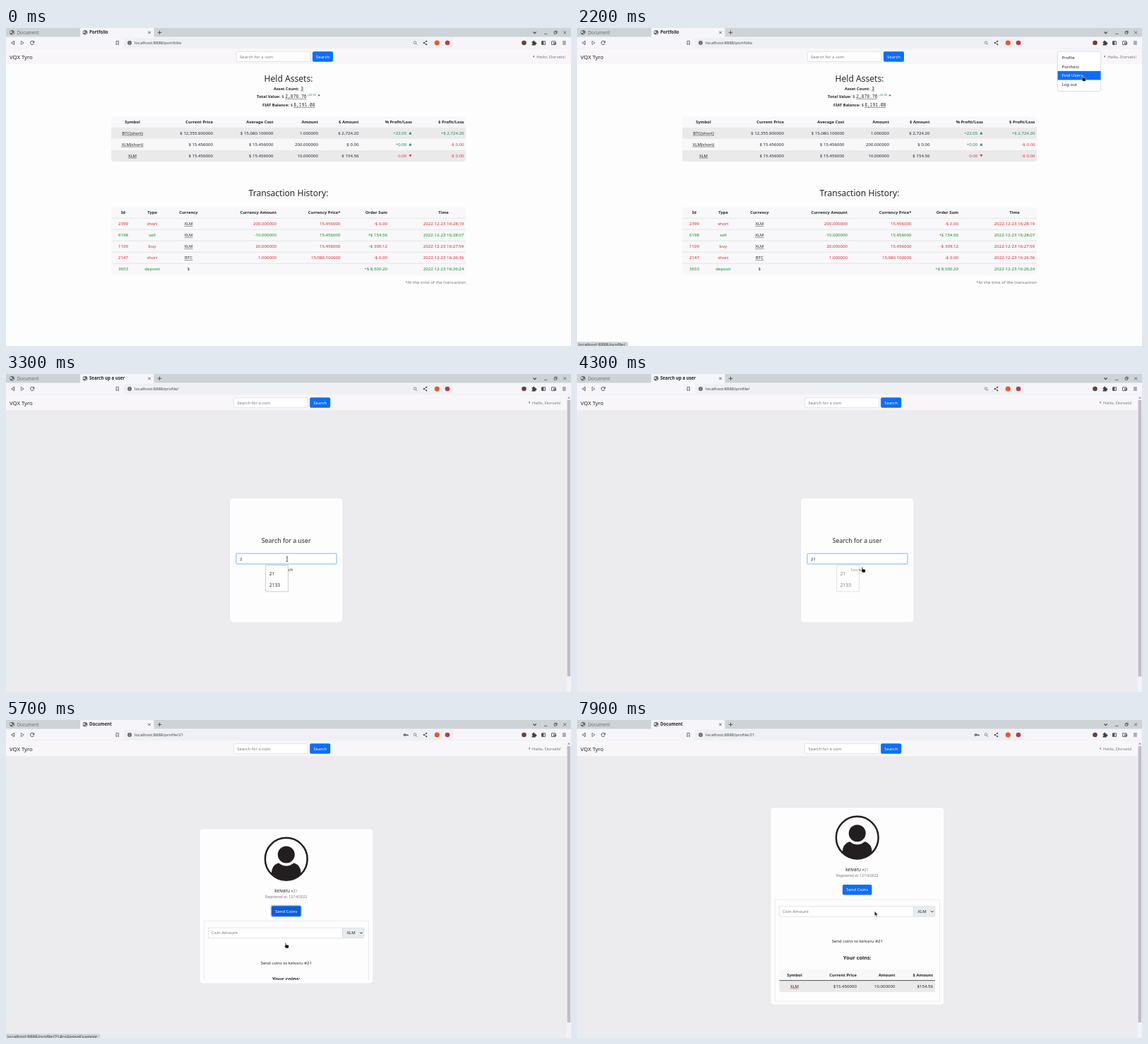
Recreate the animation shown at these times as an HTML page. Size 800 px wide and 450 px high, loop 8 s.

```html
<!DOCTYPE html>
<html lang="en">
<head>
<meta charset="utf-8">
<title>Portfolio</title>
<style>
  html, body { margin: 0; width: 100%; height: 100%; overflow: hidden; background: #fefdfe; }
  svg { display: block; width: 100vw; height: 100vh; }
  text { font-family: "Noto Sans", "Open Sans", sans-serif; white-space: pre; }
  .mono { font-family: "Noto Sans Mono", monospace; }
</style>
</head>
<body>
<svg id="stage" viewBox="0 0 800 450" xmlns="http://www.w3.org/2000/svg"></svg>
<script>
const LOOP = 8000, STEP = 100;
const INK = '#212529', GREY = '#737679', BLUE = '#0d6efd', PALE = '#f8f7f9', BAND = '#ebeaeb';
const APP = 'VQX Tyro', OWNER = 'Dorvels', FRIEND = 'kelvaru';

// y is the middle of the capitals
function text(x, y, s, o = {}) {
  const { size = 6, fill = INK, at = 'start', w = 400, cls = '', id = '' } = o;
  return `<text x="${x}" y="${(y + size * 0.357).toFixed(2)}" font-size="${size}" fill="${fill}" text-anchor="${at}"
    font-weight="${w}" class="${cls}" id="${id}">${s}</text>`;
}
const mid = (x, y, s, o) => text(x, y, s, { at: 'middle', ...o });
const end = (x, y, s, o) => text(x, y, s, { at: 'end', ...o });
const rect = (x, y, w, h, fill, o = '') => `<rect x="${x}" y="${y}" width="${w}" height="${h}" fill="${fill}" ${o}/>`;
const line = (d, stroke = '#444', w = 0.8, o = '') =>
  `<path d="${d}" fill="none" stroke="${stroke}" stroke-width="${w}" ${o}/>`;
const shape = (d, fill) => `<path d="${d}" fill="${fill}"/>`;
const disc = (x, y, r, fill, o = '') => `<circle cx="${x}" cy="${y}" r="${r}" fill="${fill}" ${o}/>`;
const group = (id, body, o = '') => `<g id="${id}" ${o}>${body}</g>`;
const rule = (x, y, w, c = '#5b4548') => line(`M${x} ${y}h${w}`, c, 0.55);
const arrowUp = (x, y, r, c) => shape(`M${x - r} ${y + r * .8}h${2 * r}l${-r} ${-r * 1.7}z`, c);
const arrowDown = (x, y, r, c) => shape(`M${x - r} ${y - r * .8}h${2 * r}l${-r} ${r * 1.7}z`, c);
const linked = (x, y, s, w, c) => mid(x, y, s) + rule(x - w / 2, y + 3.4, w, c);

function globe(x) {
  return disc(x, 6.3, 3.3, '#5f6368') + shape(`M${x - 2.4} 4.4l2.2 .2l.6 1.5l-1.4 1.2l-1.8 -.6z`, '#dfe2e5')
    + shape(`M${x + .6} 7.2l1.8 -.4l-.6 1.8l-1.4 .5z`, '#dfe2e5');
}

function browser() {
  const dark = '#3c4043';
  return rect(0, 0, 800, 13, '#cdd3d7') + rect(0, 12.5, 800, 16, '#f6f5f9') + rect(105, 0, 104.5, 13, '#f6f5f9', 'rx="1.5"')
    + rect(167, 13.8, 466, 14, '#eff0f4', 'rx="2"')
    + globe(8.5) + text(15.5, 6.3, 'Document', { size: 6.3, fill: '#6b7075' })
    + globe(112) + text(118, 6.3, '', { size: 6.1, w: 700, id: 'title' })
    + line('M201.3 4.7l3.4 3.4m0 -3.4l-3.4 3.4', dark)
    + line('M214.7 6.4h5.6m-2.8 -2.8v5.6', dark)
    + line('M746.4 5.4l2.2 2.2l2.2 -2.2', dark, 1.1)
    + line('M762 8.4h4.4M776.2 5.3h3v3h-3zM777.2 5.2v-1h3v3h-1M789.2 4.4l4 4m0 -4l-4 4', dark, 0.7)
    + line('M11.5 18.4v5.2l-4 -2.6z', dark) + line('M21.3 18.4v5.2l4 -2.6z', '#62666a')
    + line('M39.2 19.4a2.6 2.6 0 1 0 .3 2.4', dark, 0.9) + shape('M40.2 17.9v2.8h-2.8z', dark)
    + line('M156 18.5h3.4v5.2l-1.7 -1.4l-1.7 1.4z', dark, 0.7)
    + disc(175, 21, 2.9, '#5f6368') + line('M175 20.5v2.2M175 19v.8', '#fff', 0.7)
    + text(182, 21, '', { size: 5.93, fill: '#45484c', id: 'url' })
    + group('key', disc(564.6, 21, 1.3, 'none', `stroke="${dark}" stroke-width="1.1"`) + line('M566 21h3.2v1.4m-1.3 -1.4v1.2', dark, 1))
    + disc(579, 20.6, 1.8, 'none', 'stroke="#666a6e" stroke-width=".7"') + line('M580.3 21.9l1.9 1.9', '#666a6e')
    + line('M595.3 18.8l-3.6 2.2l3.6 2.2', dark, 0.7)
    + [[595.3, 18.8], [591.7, 21], [595.3, 23.2]].map(([x, y]) => disc(x, y, 1, dark)).join('')
    + disc(610.3, 21, 3.6, '#f0552b') + disc(625, 21, 3.3, '#b83a4c')
    + disc(733.5, 21, 3.3, '#6b4039')
    + shape('M744.6 19.2h1.6a1.1 1.1 0 1 1 2 0h1.6v1.6a1.1 1.1 0 1 1 0 2v1.6h-5.2v-1.6a1 1 0 1 0 0 -2z', dark)
    + line('M758.6 18.8h5v4.6h-5zM761 18.8v4.6', dark) + shape('M758.6 18.8h2v4.6h-2z', dark)
    + line('M772.6 18.8h5.4v4.8h-5.4zM775.5 20.8h3.2v1.6h-3.2z', dark)
    + line('M788 19h4.8m-4.8 2h4.8m-4.8 2h4.8', dark);
}

function navbar() {
  const bar = rect(0, 28.5, 800, 22.5, '#f8f6f9') + line('M0 28.6h800', '#dddde1', 0.5);
  const finder = rect(326.4, 33.6, 105, 14, '#fff', 'stroke="#ced4da" stroke-width=".6" rx="2"')
    + text(331, 40.4, 'Search for a coin', { fill: GREY })
    + rect(434, 33.2, 29, 14.6, BLUE, 'rx="2"') + mid(448.5, 40.4, 'Search', { fill: '#fff' });
  const hello = shape('M748 38.6v3.4l-1.9 -1.7z', GREY) + end(792, 40.4, `Hello, ${OWNER}!`, { fill: GREY });
  return bar + text(5, 41, APP, { size: 7.7, w: 500 }) + group('finder', finder) + group('hello', hello);
}

function portfolio() {
  const teal = '#198754', red = '#dc3545', size = 6.1, bold = { size: 5.85, w: 700 };
  const head = { size: 12.1, w: 500 }, label = { size: 5.75, w: 600 }, mono = { size: 6.3, cls: 'mono' };
  let s = mid(400, 71.5, 'Held Assets:', head)
    + text(379, 85.5, 'Asset Count:', label) + text(417.3, 85.5, '3', mono) + rule(417, 89, 4.4)
    + text(355, 97, 'Total Value:', label) + text(390.3, 97, '$') + text(395.3, 97, '2,878.76', mono) + rule(395, 100.5, 30)
    + text(426.5, 94.8, '+22.05', { size: 4, fill: teal }) + arrowUp(443, 95, 1.6, teal)
    + text(363, 109, 'FIAT Balance:', label) + text(402.7, 109, '$') + text(407.3, 109, '8,191.08', mono) + rule(407, 112.5, 30.4);

  s += rect(149, 125, 502, 64, PALE, 'rx="4"') + rect(149, 140.7, 502, 16, BAND) + rect(149, 173, 502, 16, BAND, 'rx="4"')
    + rect(149, 173, 502, 8, BAND);
  const cols = [293, 378.5, 442, 499.5];
  s += mid(179, 132.7, 'Symbol', bold)
    + ['Current Price', 'Average Cost', 'Amount', '$ Amount'].map((h, i) => end(cols[i], 132.7, h, bold)).join('')
    + end(575, 132.7, '% Profit/Loss', bold) + end(648.5, 132.7, '$ Profit/Loss', bold);
  [
    ['BTC(short)', 30, '$ 12,355.900000', '$ 15,080.100000', '1.000000', '$ 2,724.20', '+22.05', '+$ 2,724.20', teal, teal],
    ['XLM(short)', 31, '$ 15.456000', '$ 15.456000', '200.000000', '$ 0.00', '+0.00', '-$ 0.00', teal, red],
    ['XLM', 12, '$ 15.456000', '$ 15.456000', '10.000000', '$ 154.56', '0.00', '-$ 0.00', red, red]
  ].forEach(([name, w, ...r], i) => {
    const y = 148.7 + 16 * i;
    s += linked(179, y, name, w) + cols.map((x, k) => end(x, y, r[k], { size })).join('')
      + end(567.3, y, r[4], { size, fill: r[6] }) + (r[6] === teal ? arrowUp : arrowDown)(572.4, y, 2.1, r[6])
      + end(648.5, y, r[5], { size, fill: r[7] });
  });

  s += mid(400, 234, 'Transaction History:', head) + rect(149, 253.5, 502, 96, PALE, 'rx="4"');
  s += mid(166, 261, 'Id', bold) + mid(207, 261, 'Type', bold) + mid(258.5, 261, 'Currency', bold)
    + end(383, 261, 'Currency Amount', bold) + end(473.5, 261, 'Currency Price*', bold)
    + end(540, 261, 'Order Sum', bold) + mid(619.5, 261, 'Time', bold);
  [
    ['2399', 'short', 'XLM', '200.000000', '15.456000', '-$ 0.00', '28:19'],
    ['6198', 'sell', 'XLM', '-10.000000', '15.456000', '+$ 154.56', '28:07'],
    ['1109', 'buy', 'XLM', '20.000000', '15.456000', '-$ 309.12', '27:59'],
    ['2147', 'short', 'BTC', '1.000000', '15,080.100000', '-$ 0.00', '26:36'],
    ['3653', 'deposit', '$', '', '', '+$ 8,500.20', '26:24']
  ].forEach(([id, type, cur, amount, price, sum, time], i) => {
    const y = 277.2 + 16 * i, o = { size, fill: sum[0] === '+' ? '#128a1e' : '#dc2430' };
    s += line(`M149 ${y - 8}h502`, '#d9d8db', 0.6)
      + mid(166, y, id, o) + mid(207, y, type, o) + (cur === '$' ? mid(258.5, y, cur) : linked(258.5, y, cur, 12))
      + end(383, y, amount, o) + end(473.5, y, price, o) + end(540, y, sum, o) + end(648.3, y, '2022-12-23 16:' + time, o);
  });
  return s + end(651, 359.8, '*At the time of the transaction', { fill: GREY });
}

function menu() {
  return rect(680.3, 33.2, 61.4, 56.3, '#fff', 'stroke="#c9c9cd" stroke-width=".6" rx="2.5"')
    + rect(680.5, 61, 61, 12.6, '#e9ecef', 'id="pick"')
    + ['Profile', 'Portfolio', 'Find Users', 'Log out']
      .map((s, i) => text(686.5, 42.2 + 12.4 * i, s, { id: 'item' + i })).join('');
}

const backdrop = () => rect(0, 51, 800, 399, '#ecebee');
const cardEdge = 'stroke="#e0dfe3" stroke-width=".6" rx="5"';

function lookup() {
  return rect(316.5, 175.2, 160.5, 176.6, '#fefdfe', cardEdge)
    + mid(396.7, 236.2, 'Search for a user', { size: 8.8, w: 500 })
    + rect(325, 253, 144, 16.8, '#c2dbfe', 'rx="2.5" id="halo"')
    + rect(326.2, 254.3, 141.6, 14.2, '#fff', 'stroke="#ced4da" stroke-width=".6" rx="1.5" id="field"')
    + text(331, 261.4, '', { id: 'entry' }) + mid(396.7, 276.5, 'Search')
    + group('hints', rect(367.8, 270.5, 31.6, 37.4, '#fff', 'stroke="#b5b5ba" stroke-width=".7"')
      + text(372.7, 283, '21', { size: 6.8, fill: '#33363a' }) + text(372.7, 298.3, '2133', { size: 6.8, fill: '#33363a' }));
}

function avatar(x, y) {
  return `<clipPath id="round"><circle cx="${x}" cy="${y}" r="30"/></clipPath>`
    + disc(x, y, 29.9, '#fefdfe', 'stroke="#231f20" stroke-width="2.5"') + disc(x, y - 6.3, 12, '#231f20')
    + `<g clip-path="url(#round)">${shape(`M${x - 21} ${y + 32}v-11q0 -12 10 -15.5q11 8.5 22 0q10 3.5 10 15.5v11z`, '#231f20')}</g>`;
}

function panel() {
  const bold = { size: 5.85, w: 700 }, size = 6.1;
  return rect(280.5, 254, 233, 144, 'none', 'stroke="#dedde1" stroke-width=".6"')
    + rect(286.3, 263.8, 190.4, 14.4, '#fff', 'stroke="#ced4da" stroke-width=".6"')
    + text(291, 271, 'Coin Amount', { fill: GREY })
    + rect(476.7, 263.8, 30, 14.4, '#e9ecef', 'stroke="#ced4da" stroke-width=".6" rx="1"')
    + text(482.5, 271, 'XLM') + line('M501.2 270.2l1.7 1.7l1.7 -1.7', INK, 1)
    + mid(396.8, 313.2, `Send coins to ${FRIEND} #21`)
    + mid(396.8, 336.3, 'Your coins:', { size: 7.3, w: 600 })
    + rect(286.6, 352.5, 220.4, 24, PALE, 'rx="3"') + rect(286.6, 368.5, 220.4, 16.4, BAND, 'rx="3"')
    + rect(286.6, 368.5, 220.4, 8, BAND) + line('M286.6 368.6h220.4', '#333', 0.8)
    + mid(308, 360.5, 'Symbol', bold) + end(396, 360.5, 'Current Price', bold)
    + end(450.5, 360.5, 'Amount', bold) + end(504, 360.5, '$ Amount', bold)
    + linked(308, 376.6, 'XLM', 12, '#b5484e') + end(396, 376.6, '$15.456000', { size })
    + end(450.5, 376.6, '10.000000', { size }) + end(504, 376.6, '$154.56', { size });
}

const RISE = 71.7;
function profile() {
  return rect(274, 195.2, 245.8, 136.4, '#fefdfe', cardEdge + ' id="card"')
    + '<clipPath id="fold"><rect id="foldBox" x="270" y="325" width="250" height="0"/></clipPath>'
    + group('lift', avatar(396.8, 238.2)
      + end(402, 283.2, FRIEND, { size: 6.3 }) + text(403.4, 283.4, '#21', { size: 5.1, fill: GREY })
      + mid(396.7, 292, 'Registered at: 12/14/2022', { size: 4.93, fill: GREY })
      + rect(374.7, 303.3, 44, 17.2, '#9ec5fe', 'rx="3" id="ring"')
      + rect(376, 304.6, 41.5, 14.7, BLUE, 'rx="2" id="send"') + mid(396.8, 312, 'Send Coins', { fill: '#fff' })
      + `<g clip-path="url(#fold)"><g transform="translate(0 ${RISE})">${panel()}</g></g>`);
}

function pointer() {
  const edge = 'stroke="#fff" stroke-width=".5" stroke-linejoin="round"';
  return group('arrow', `<path d="M0 0v6.8l1.6 -1.4l1.1 2.5l1.2 -.5l-1.1 -2.5h2.1z" fill="#222" ${edge}/>`)
    + group('hand', `<path d="M-.7 .6q.7 -1 1.4 0v2.3l3 .7q.9 .3 .8 1.4l-.5 3h-3.7l-2.2 -3q.2 -1 1.2 -.3z" fill="#111" ${edge}/>`)
    + group('beam', line('M-1.3 -3.2h2.6M0 -3.2v6.4M-1.3 3.2h2.6', '#222', 0.7));
}

const stage = document.getElementById('stage');
stage.innerHTML = rect(0, 0, 800, 450, '#fefdfe')
  + group('portfolio', portfolio())
  + group('gray', backdrop()) + group('lookup', lookup()) + group('profile', profile())
  + navbar() + group('menu', menu())
  + group('scroll', rect(793.5, 29, 6.5, 421, '#f3f2f5') + shape('M795.2 34.5h3.6l-1.8 -2.2z', '#85888c') + rect(794.6, 37, 4.6, 391, '#bfbec2'))
  + browser()
  + group('status', rect(-1, 444, 1, 8, '#d3d5d9', 'rx="1.5" id="bubble"') + text(2, 449, '', { size: 6.3, fill: '#3f4347', id: 'hover' }))
  + group('cursor', pointer());

const el = {};
stage.querySelectorAll('[id]').forEach(n => { if (n.id) el[n.id] = n; });
const show = (id, on) => el[id].setAttribute('display', on ? 'inline' : 'none');
const set = (id, a, v) => el[id].setAttribute(a, v);
const write = (id, s) => { if (el[id].textContent !== s) el[id].textContent = s; };

// time, x, y, pointer kind from that time on
const PATH = [
  [700, 610, 190, 'arrow'], [1100, 771, 41, 'hand'], [1400, 769, 41, 'hand'], [1600, 735, 46, 'hand'],
  [1900, 716.6, 67.5, 'hand'], [2300, 716, 67.3, 'arrow'], [2500, 690, 92, 'arrow'], [2900, 398, 262, 'beam'],
  [3900, 398, 262, 'beam'], [4100, 403, 271, 'hand'], [4200, 404, 273, 'hand'], [4500, 404, 273, 'arrow'],
  [5000, 396.3, 300, 'arrow'], [5100, 396.3, 300, 'arrow'], [5300, 396, 315, 'hand'], [6800, 396, 315, 'hand'],
  [6900, 405, 308, 'arrow'], [7200, 492, 272, 'arrow'], [7400, 488, 310, 'arrow'], [7700, 469, 352, 'arrow'],
  [7900, 421.3, 270.5, 'arrow']
];

function moveCursor(t) {
  show('cursor', t >= PATH[0][0]);
  let i = 0;
  while (i < PATH.length - 2 && t >= PATH[i + 1][0]) i++;
  const a = PATH[i], b = PATH[i + 1];
  const u = Math.min(1, Math.max(0, (t - a[0]) / (b[0] - a[0]))), e = u * u * (3 - 2 * u);
  set('cursor', 'transform', `translate(${a[1] + (b[1] - a[1]) * e} ${a[2] + (b[2] - a[2]) * e})`);
  const kind = (u === 1 ? b : a)[3];
  ['arrow', 'hand', 'beam'].forEach(k => show(k, k === kind));
}

function draw(t) {
  const within = (a, b) => t >= a && t < b;
  const page = t < 2300 ? 0 : t < 4500 ? 1 : 2;
  ['portfolio', 'lookup', 'profile'].forEach((id, i) => show(id, i === page));
  show('gray', page > 0);
  show('scroll', page > 0);
  set('finder', 'transform', `translate(${page ? -3.8 : 0} 0)`);
  set('hello', 'transform', `translate(${page ? -6.3 : 0} 0)`);
  write('title', ['Portfolio', 'Search up a user', 'Document'][page]);
  write('url', 'localhost:8888/' + ['portfolio', 'profile/', 'profile/21'][page]);
  show('key', t >= 4900);

  show('menu', within(1400, 2300));
  const row = t < 1700 ? -1 : t < 1800 ? 1 : 2, pressed = t >= 2200;
  show('pick', row >= 0);
  set('pick', 'y', 36.1 + 12.4 * row);
  set('pick', 'fill', pressed ? BLUE : '#e9ecef');
  set('item2', 'fill', pressed ? '#fff' : INK);

  const focus = t >= 3000, typed = t < 3300 ? '' : t < 3500 ? '2' : '21';
  show('halo', focus);
  set('field', 'stroke', focus ? '#86b7fe' : '#ced4da');
  write('entry', typed || 'Search for a user (by id)');
  set('entry', 'fill', typed ? INK : GREY);
  show('hints', within(3300, 4400));
  set('hints', 'opacity', t < 4300 ? 1 : 0.6);

  const p = 1 - (1 - Math.min(1, Math.max(0, (t - 5600) / 400))) ** 3;
  set('card', 'y', 195.2 - RISE * p);
  set('card', 'height', 136.4 + 143.4 * p);
  set('lift', 'transform', `translate(0 ${-RISE * p})`);
  set('foldBox', 'height', 146 * p);
  show('ring', within(5600, 6900));
  set('send', 'fill', within(5300, 6100) ? '#0b5ed7' : BLUE);

  const first = within(2200, 2700);
  show('status', first || within(5400, 6300));
  set('bubble', 'width', first ? 73.5 : 134.5);
  write('hover', 'localhost:8888/profile/' + (first ? '' : '21#collapseExample'));
  moveCursor(t);
}

const start = performance.now();
function tick(now) {
  const t = Math.max(0, now - start) % LOOP;
  draw(Math.floor(t / STEP) * STEP);
  requestAnimationFrame(tick);
}
draw(0);
requestAnimationFrame(tick);
</script>
</body>
</html>
```
